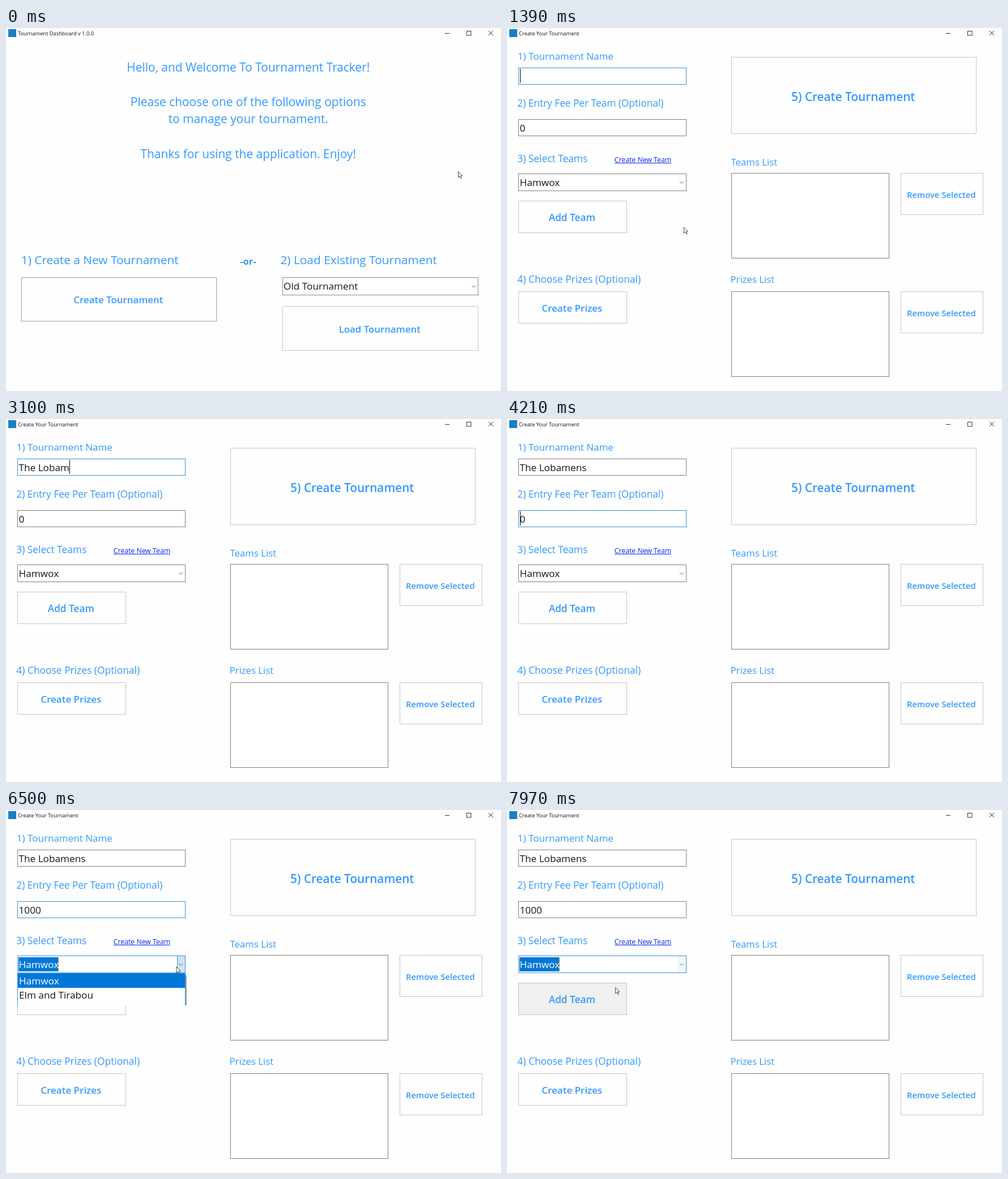
An HTML page with a canvas that plays this animation: 874 px wide and 641 px high, repeating every 8000 ms.

```html
<!DOCTYPE html>
<html lang="en">
<head>
<meta charset="utf-8">
<title>Tournament Dashboard</title>
<style>
html, body { margin: 0; width: 100%; height: 100%; overflow: hidden; background: #fff; }
canvas { display: block; }
</style>
</head>
<body>
<canvas id="stage" width="874" height="641"></canvas>
<script>
const ctx = document.getElementById('stage').getContext('2d');
const LOOP = 8000;
const BLUE = '#3399ff', INK = '#151515', FRAME = '#808080', SOFT = '#c6c6c6';
const ACCENT = '#0078d7', FOCUS = '#3a91dc';

const TEAMS = ['Hamwox', 'Elm and Tirabou', 'Prelo and Uvan', 'Team Copper'];
const NAME = 'The Lobamens';
const NAME_KEYS = [2170, 2320, 2400, 2480, 2640, 2790, 2870, 3030, 3100, 3650, 3730, 3810];
const FEE_KEYS = [4370, 4450, 4690, 5080];

const SWITCH = 1390, OPEN = 6420, PICK = 7810;
const CLICKS = [[1080, 1310], [6340, 6500], [7660, 7810]];

// time, x, y of the pointer tip
const POINTER = [
  [300, 798, 253], [450, 740, 214], [600, 650, 190], [750, 530, 238],
  [900, 400, 385], [1000, 315, 480], [1080, 283, 504.5], [1230, 283, 504.5],
  [1310, 289, 465], [1470, 335, 235], [1545, 343, 196], [5690, 341, 197],
  [5860, 335, 215], [6020, 322, 245], [6180, 309, 266], [6340, 305, 272],
  [6500, 300, 277], [6580, 278, 302], [6660, 250, 335], [6800, 218, 362],
  [7030, 217, 358], [7200, 213, 325], [7410, 210, 299], [7790, 210, 299],
  [7880, 201, 306], [7960, 191, 313]
];

const within = (t, from, to) => t >= from && t < to;
const ramp = (t, from, to) => Math.min(1, Math.max(0, (t - from) / (to - from)));
const typed = (t, keys) => keys.filter(k => t >= k).length;

function pointerAt(t) {
  const step = 78.4;
  const q = 370 + Math.floor((t - 362) / step) * step;
  const next = POINTER.findIndex(p => p[0] > q);
  if (next === 0) return POINTER[0].slice(1);
  if (next < 0) return POINTER[POINTER.length - 1].slice(1);
  const a = POINTER[next - 1], b = POINTER[next], k = ramp(q, a[0], b[0]);
  return [a[1] + (b[1] - a[1]) * k, a[2] + (b[2] - a[2]) * k];
}

function text(str, x, y, size, { color = BLUE, weight = 400, align = 'left' } = {}) {
  ctx.font = `${weight} ${size}px "Open Sans", "Noto Sans", sans-serif`;
  ctx.textAlign = align;
  ctx.fillStyle = color;
  ctx.fillText(str, x, y);
}

const inputText = (str, x, y, color = INK) => text(str, x, y, 17.2, { color });

function fill(x, y, w, h, color) {
  ctx.fillStyle = color;
  ctx.fillRect(x, y, w, h);
}

function box(x1, y1, x2, y2, stroke, bg, width = 1) {
  if (bg) fill(x1, y1, x2 - x1, y2 - y1, bg);
  ctx.strokeStyle = stroke;
  ctx.lineWidth = width;
  ctx.strokeRect(x1 + width / 2, y1 + width / 2, x2 - x1 - width, y2 - y1 - width);
}

function line(color, width, ...points) {
  ctx.beginPath();
  points.forEach(([x, y]) => ctx.lineTo(x, y));
  ctx.strokeStyle = color;
  ctx.lineWidth = width;
  ctx.stroke();
}

function button(label, x1, y1, x2, y2, baseline, size, { bg = '#fefefe', stroke = SOFT, width = 1 } = {}) {
  box(x1, y1, x2, y2, stroke, bg, width);
  text(label, (x1 + x2) / 2 - 1.2, baseline, size, { weight: 600, align: 'center' });
}

const chevron = (x, y) => line('#666', 1, [x - 3.5, y - 2], [x, y + 1.5], [x + 3.5, y - 2]);

function field(x1, y1, x2, y2, focus) {
  box(x1, y1, x2, y2, FRAME, '#fff');
  ctx.globalAlpha = focus;
  box(x1, y1, x2, y2, FOCUS);
  ctx.globalAlpha = 1;
}

function caret(str, y) {
  ctx.font = '17.2px "Open Sans", "Noto Sans", sans-serif';
  fill(Math.round(22.5 + ctx.measureText(str).width), y, 1, 25, '#000');
}

function titleBar(title) {
  fill(4, 2, 14, 14, '#1b7fc6');
  text(title, 21, 12.5, 9.3, { color: '#111' });
  line('#333', 1, [775, 9.5], [783, 9.5]);
  box(813, 5, 821.5, 13.5, '#333');
  line('#333', 1, [852, 5], [860, 13]);
  line('#333', 1, [860, 5], [852, 13]);
}

function dashboard(t, [mx, my]) {
  titleBar('Tournament Dashboard v 1.0.0');
  [['Hello, and Welcome To Tournament Tracker!', 76.5],
   ['Please choose one of the following options', 137.5],
   ['to manage your tournament.', 168],
   ['Thanks for using the application. Enjoy!', 229.5]]
    .forEach(([str, y]) => text(str, 427.8, y, 20.92, { align: 'center' }));

  text('1) Create a New Tournament', 26.7, 417, 20.86);
  text('2) Load Existing Tournament', 484.4, 417, 20.86);
  text('-or-', 427.5, 418, 16.3, { weight: 700, align: 'center' });

  const hover = mx > 27 && mx < 372 && my > 440 && my < 518;
  const bg = !hover ? '#fefefe' : t >= 1080 ? '#656665' : '#efefef';
  button('Create Tournament', 26.5, 440, 372.5, 518.5, 486, 16.85, { bg, stroke: '#bababa', width: 1.5 });

  box(488, 440, 834, 472, '#8c8c8c', '#fff');
  inputText('Old Tournament', 490, 462);
  chevron(826, 456.5);
  button('Load Tournament', 488, 491, 834, 570, 537.5, 16.85);
}

function comboBox(t, [mx, my]) {
  const active = t >= OPEN, opened = active && t < PICK;
  const hover = mx > 20 && mx < 316 && my > 257 && my < 288 && t >= 5700;
  box(20, 257, 317, 288, active ? FOCUS : FRAME, '#fff');
  if (opened || hover) box(302, 257, 317, 288, FOCUS, '#cfe3f5');
  else if (active) {
    fill(303, 258, 13, 29, '#f3f8fc');
    line('#d3e6f7', 1, [302.5, 258], [302.5, 287]);
  }
  chevron(308.5, 273);
  if (active) {
    fill(22, 260, 70, 25, ACCENT);
    fill(92, 260, 1, 25, '#e59b3b');
  }
  inputText(TEAMS[0], 22.5, 278.7, active ? '#fff' : INK);
}

function dropDown(t, my) {
  if (!within(t, OPEN + 70, PICK)) return;
  const full = t >= 6575;
  ctx.save();
  ctx.beginPath();
  ctx.rect(19, 288, 302, full ? 105 : 57);
  ctx.clip();
  fill(25, 293, 294, 98, '#b5b5b5');
  fill(23, 291, 295, 99, '#8e8e8e');
  box(20, 288, 317, 389, FOCUS, '#fff');
  const hovered = Math.min(3, Math.max(0, Math.floor((my - 289) / 24.8)));
  TEAMS.forEach((team, i) => {
    const on = i === hovered, y = 289 + i * 24.8;
    if (on) fill(21, Math.round(y), 295, 25, ACCENT);
    inputText(team, 23, y + 19, on ? '#fff' : INK);
  });
  ctx.restore();
}

function createScreen(t, pointer) {
  const [mx, my] = pointer;
  titleBar('Create Your Tournament');

  text('1) Tournament Name', 18.8, 56, 17.05);
  field(20, 70, 317, 100, 1 - ramp(t, 4000, 4210));
  const name = NAME.slice(0, typed(t, NAME_KEYS));
  inputText(name, 22.5, 92);
  if (t < 1860 || within(t, 2170, 4050)) caret(name, 72);

  text('2) Entry Fee Per Team (Optional)', 18.3, 138.5, 17.25);
  field(20, 161, 317, 191, ramp(t, 4000, 4210) - ramp(t, 6500, 6660));
  const fee = t < 4290 ? '0' : '1000'.slice(0, typed(t, FEE_KEYS));
  inputText(fee, 22.5, 182.5);
  if (within(t, 4130, 5550) || within(t, 6080, OPEN)) caret(t < 4290 ? '' : fee, 163);

  text('3) Select Teams', 18.3, 237, 17.35);
  text('Create New Team', 189.7, 237, 12.3, { color: '#0a22f5' });
  fill(190, 238, 100, 1, '#0a22f5');
  comboBox(t, pointer);

  const hover = t >= PICK && mx > 20 && mx < 211 && my > 305 && my < 361;
  button('Add Team', 20, 305, 212, 362, 341, 17.2, { bg: hover ? '#f0f0f0' : '#fefefe' });

  text('4) Choose Prizes (Optional)', 18.3, 450, 17.4);
  button('Create Prizes', 20, 465, 212, 522, 501, 17);

  button('5) Create Tournament', 396, 51, 829, 187, 128.5, 20.75);
  text('Teams List', 395.5, 243, 16.8);
  text('Prizes List', 394.5, 450, 16.8);
  [256, 465].forEach(y => {
    box(396, y, 675, y + 151, FRAME, '#fff');
    button('Remove Selected', 695, y, 841, y + 74, y + 43.5, 14.85);
  });
  dropDown(t, my);
}

function drawPointer(t, [x, y]) {
  if (within(t, 2170, 5690)) return;
  if (CLICKS.some(([from, to]) => within(t, from, to))) {
    ctx.beginPath();
    ctx.arc(x - .5, y - .5, 10, 0, Math.PI * 2);
    ctx.fillStyle = 'rgba(240, 240, 0, .5)';
    ctx.fill();
  }
  ctx.save();
  ctx.translate(x + .5, y + .5);
  ctx.beginPath();
  [[0, 0], [0, 10.5], [2.4, 8.3], [4.2, 12.2], [5.9, 11.4], [4.2, 7.7], [7.3, 7.4]]
    .forEach(([px, py]) => ctx.lineTo(px, py));
  ctx.closePath();
  ctx.fillStyle = '#fff';
  ctx.fill();
  ctx.strokeStyle = '#333';
  ctx.lineWidth = .9;
  ctx.stroke();
  ctx.restore();
}

function draw() {
  const t = performance.now() % LOOP;
  const pointer = pointerAt(t);
  fill(0, 0, 874, 641, '#fefefe');
  (t < SWITCH ? dashboard : createScreen)(t, pointer);
  drawPointer(t, pointer);
  requestAnimationFrame(draw);
}
draw();
</script>
</body>
</html>
```
